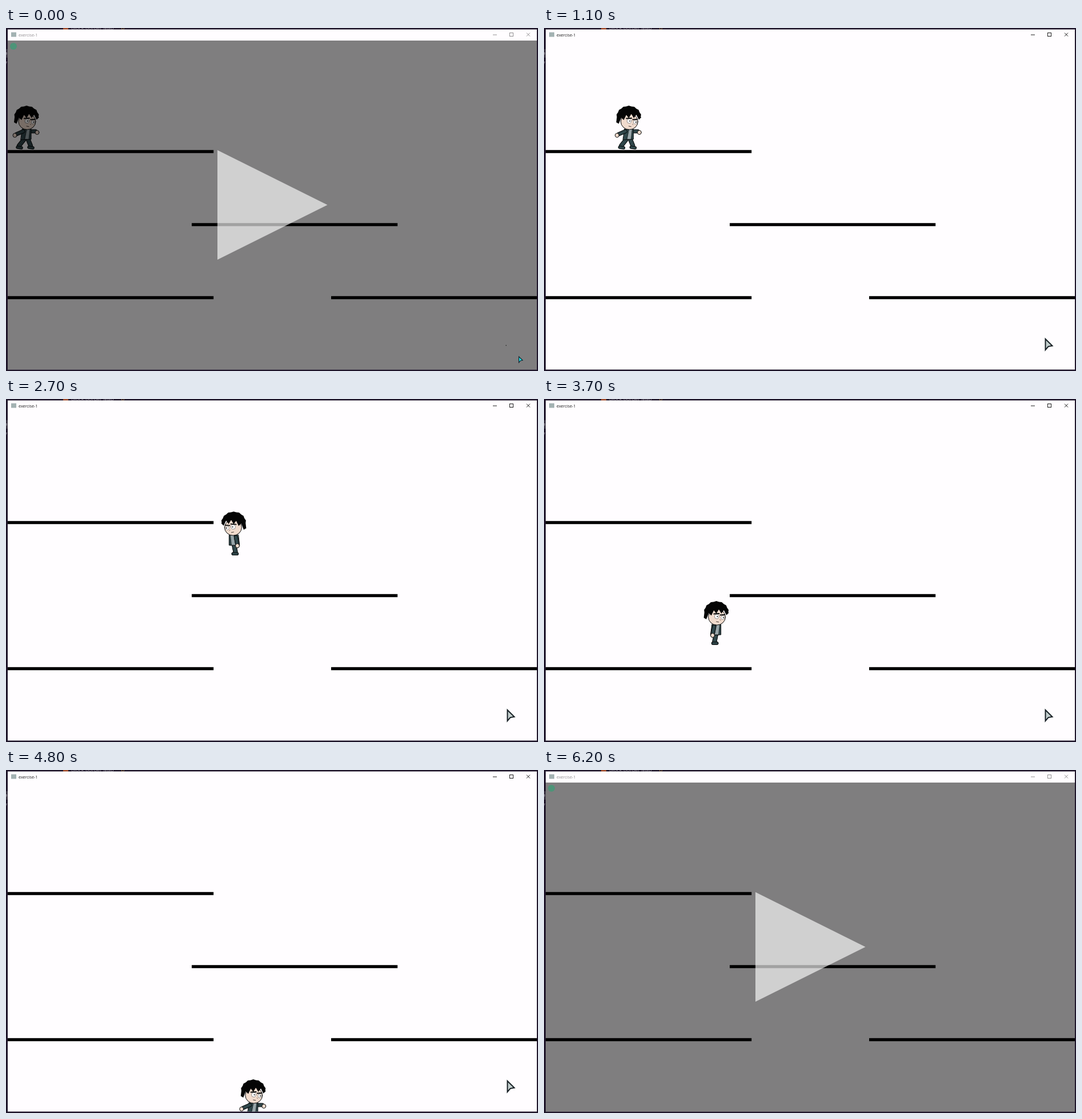
An HTML page with a canvas for the animation above (6300 ms loop, 931 by 601 pixels).

```html
<!DOCTYPE html>
<html lang="en">
<head>
<meta charset="utf-8">
<title>exercise-1</title>
<style>
html, body { margin: 0; width: 100%; height: 100%; overflow: hidden; background: #1e152a; }
canvas { display: block; }
</style>
</head>
<body>
<canvas id="stage" width="931" height="601"></canvas>
<script>
const ctx = document.getElementById('stage').getContext('2d');
const LOOP = 6300, STEP = 100;
const PLAY = 500, PAUSE = 6100;
const SPEED = 0.2, GRAVITY = 0.000874, FLOOR_GAP = 128;
const WALK = 538, TURN_LEFT = 2525, TURN_RIGHT = 3442, HALT = 4356;
const FALLS = [2326, 3246, 4214];
const PLATFORMS = [[3, 0], [325, 1], [3, 2], [569, 2]];
const CLOTH = '#30474b', SKIN = '#f1dbcd', DARK = '#080b0c';

const clamp = (v, lo, hi) => Math.max(lo, Math.min(hi, v));
const span = (t, from, to) => clamp(t, from, to) - from;

function rect(x, y, w, h, color) {
  ctx.fillStyle = color;
  ctx.fillRect(x, y, w, h);
}

function paint(fill, stroke, width = 1) {
  ctx.fillStyle = fill;
  ctx.fill();
  if (!stroke) return;
  ctx.strokeStyle = stroke;
  ctx.lineWidth = width;
  ctx.stroke();
}

function polygon(points, fill, stroke, width) {
  ctx.beginPath();
  for (const [x, y] of points) ctx.lineTo(x, y);
  ctx.closePath();
  paint(fill, stroke, width);
}

function oval(x, y, rx, ry, fill, stroke, width) {
  ctx.beginPath();
  ctx.ellipse(x, y, rx, ry, 0, 0, 7);
  paint(fill, stroke, width);
}

function line(x1, y1, x2, y2, color, width) {
  ctx.beginPath();
  ctx.moveTo(x1, y1);
  ctx.lineTo(x2, y2);
  ctx.strokeStyle = color;
  ctx.lineWidth = width;
  ctx.stroke();
}

function limb(x1, y1, x2, y2, width) {
  line(x1, y1, x2, y2, DARK, width + 2);
  line(x1, y1, x2, y2, CLOTH, width);
}

function text(str, x, y, size, color) {
  ctx.font = size + 'px "Open Sans", sans-serif';
  ctx.fillStyle = color;
  ctx.fillText(str, x, y);
}

// The editor shows only as a thin rim around the window
function drawDesktop() {
  rect(0, 0, 931, 601, '#1e152a');
  rect(0, 37, 3, 15, '#3b3544');
  rect(100, 0, 9, 3, '#a04a2a');
  text('Block.border Map', 114, 2.5, 9, '#8f8a96');
  text('{}', 201, 2, 9, '#b98a3c');
  text('e', -2, 47, 8, '#c8c4cc');
  text('r', -1, 63, 8, '#c8c4cc');
}

function drawWindow(active) {
  rect(3, 2.5, 926, 596, '#fffdff');
  rect(9, 7.5, 9, 8, '#a3b2b2');
  const ink = active ? '#1c1c1c' : '#929092';
  text('exercise-1', 22, 14.8, 7.2, ink);
  line(852, 12, 859, 12, ink, 1);
  ctx.strokeRect(881.5, 8.5, 6, 6);
  line(911, 8.5, 917, 14.5, ink, 1);
  line(917, 8.5, 911, 14.5, ink, 1);
}

// swing: 1 for a full stride, 0 with legs together
function drawArm(side, swing) {
  const x = side * 19.5 * swing - 1 - 5.5 * (1 - swing);
  const y = 60 - swing * (10.5 + 2.5 * side);
  limb(side * 6 * swing - 4 * (1 - swing), 45, x - side * 3 * swing, y - 2, 5);
  oval(x, y, 3.5, 3.6, SKIN, DARK);
}

function drawLeg(side, swing) {
  const foot = side * 10 * swing - 3;
  limb(side * 4 * swing - 1, 60, foot, 70, 6);
  limb(foot - 3, 74 - swing, foot + 4, 74, 3.5);
}

function drawBody(swing) {
  drawLeg(1, swing);
  drawLeg(-1, swing);
  drawArm(1, swing);
  polygon([[-8, 41], [8, 41], [8, 59], [-10, 60]], CLOTH, DARK);
  polygon([[0, 41], [6, 41], [4, 59], [-3, 59]], '#98a5a9', DARK, 0.7);
  drawArm(-1, swing);
}

function drawEye(x, y, r) {
  oval(x, y, r, r, '#fff', '#55504e', 0.6);
  oval(x + 1, y, 0.9, 1.1, DARK);
  line(x - r - 1, y - 4.5, x + r, y - 5, DARK, 2);
}

function drawHair() {
  const points = [];
  for (let i = 0; i <= 14; i++) {
    const a = Math.PI * (1 + i / 14), r = i % 2 ? 1 : 0.95;
    points.push([22 * r * Math.cos(a), 20 + 20 * r * Math.sin(a)]);
  }
  // Fringe: alternating spikes, longer toward the back of the head
  for (let i = 0; i <= 10; i++) {
    const x = 22 - 4.4 * i;
    points.push([x, 15 + 9 * (x / 21) ** 2 - 0.2 * x + (i % 2 ? 7 : 0)]);
  }
  polygon(points, '#050505');
}

function drawHead() {
  oval(1, 28, 15, 14, SKIN, DARK);
  drawEye(0.8, 27, 4);
  drawEye(11.3, 29, 3.3);
  drawHair();
  line(6.5, 32.5, 7.5, 33.5, '#332622', 0.8);
  line(0, 36, 4, 36.8, '#332622', 0.9);
}

function heroPosition(t) {
  const x = 36 + SPEED * (span(t, WALK, TURN_LEFT) - span(t, TURN_LEFT, TURN_RIGHT)
    + span(t, TURN_RIGHT, HALT));
  const y = FALLS.reduce((sum, start, i) => {
    const drop = GRAVITY / 2 * Math.max(0, t - start) ** 2;
    return sum + (i < 2 ? Math.min(FLOOR_GAP, drop) : drop);
  }, 136);
  return [x, y];
}

function drawHero(t) {
  const [x, y] = heroPosition(t);
  if (y > 596) return;
  const walking = t > WALK && t < HALT;
  const together = walking && Math.floor((t - WALK) / 238) % 2;
  ctx.save();
  ctx.beginPath();
  ctx.rect(3, 22, 926, 576.5);
  ctx.clip();
  ctx.translate(x, y);
  if (t >= TURN_LEFT && t < TURN_RIGHT) ctx.scale(-1, 1);
  ctx.lineCap = 'round';
  drawBody(together ? 0 : 1);
  drawHead();
  ctx.restore();
}

function drawPauseScreen() {
  rect(3, 22, 926, 576.5, 'rgba(0,0,0,0.5)');
  oval(13, 32, 6, 6, '#4d9478');
  polygon([[370, 214], [562.5, 310], [370, 406]], 'rgba(255,255,255,0.635)');
}

function drawArrow(x, y, size, fill, edge) {
  ctx.save();
  ctx.translate(x, y);
  ctx.scale(size, size);
  polygon([[0, 0.5], [0, 19.5], [5, 13.6], [12, 12.3]], fill, edge, 2);
  ctx.restore();
}

function drawCursor(t) {
  if (t < PLAY) {
    const k = span(t, 200, PLAY) / 300;
    rect(874.5, 555.5, 1.5, 1.5, '#333');
    drawArrow(897.5 - 20 * k, 575.5 - 31 * k, 0.55, '#20e2e6', '#10202c');
  } else if (t < 5800) {
    const k = span(t, 5400, 5800) / 400;
    drawArrow(877.5 + 54 * k, 544.5, 1, '#c3cfce', '#182126');
  }
}

function draw(t) {
  const active = t >= PLAY && t < PAUSE;
  drawDesktop();
  drawWindow(active);
  for (const [x, row] of PLATFORMS) rect(x, 213.8 + FLOOR_GAP * row, 360.2, 5.4, '#000');
  drawHero(t);
  if (!active) drawPauseScreen();
  drawCursor(t);
}

const begin = performance.now();
function tick() {
  const t = (performance.now() - begin) % LOOP;
  draw(Math.floor(t / STEP) * STEP);
  requestAnimationFrame(tick);
}
tick();
</script>
</body>
</html>
```
